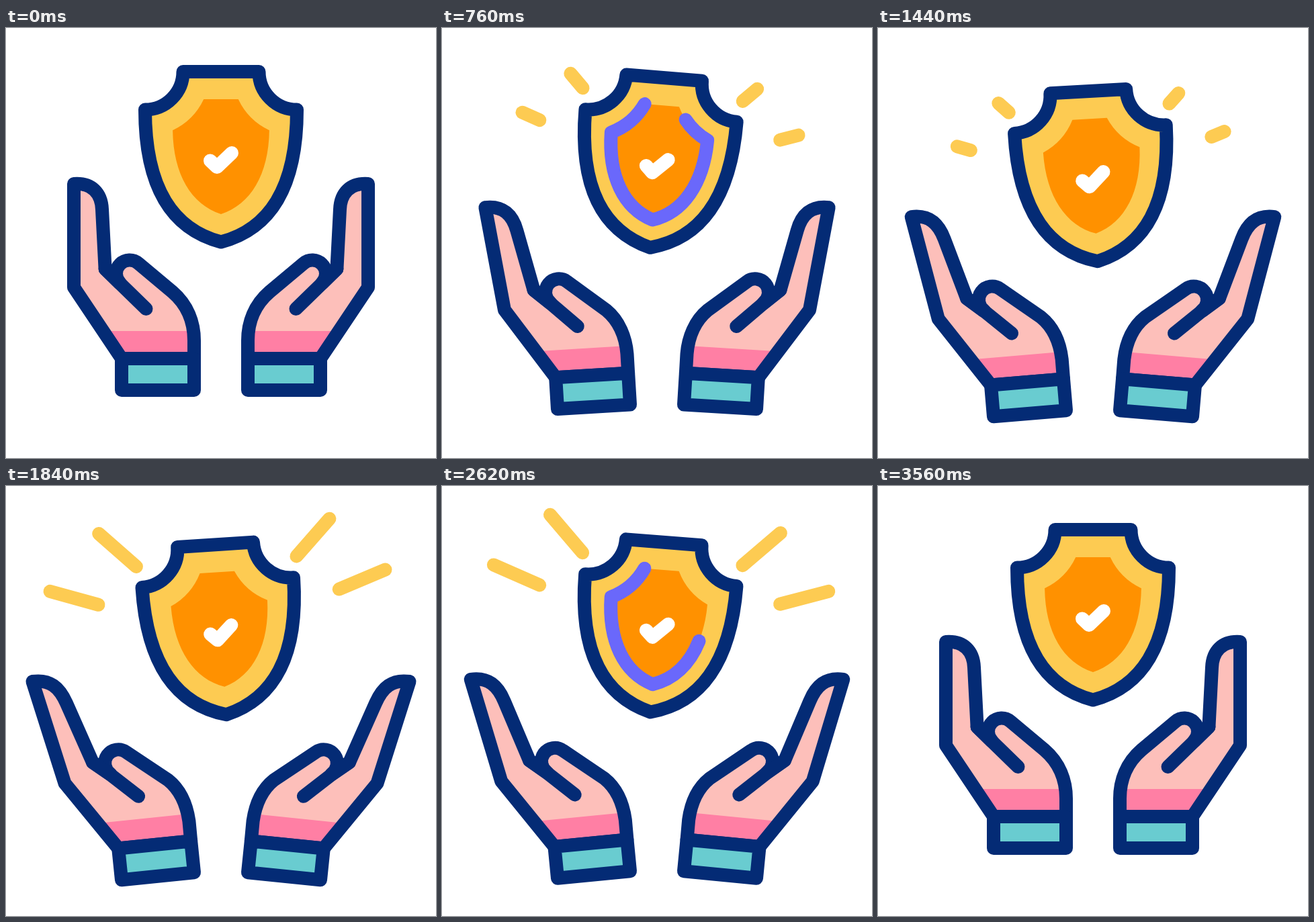
Animation, 640 px wide and 640 px high, one loop 3.6 s. Source, as an HTML page with a canvas:

```html
<!DOCTYPE html>
<html lang="en">
<head>
<meta charset="utf-8">
<title>Shield between hands</title>
<style>
  html, body { margin: 0; width: 100%; height: 100%; overflow: hidden; background: #fff; }
  canvas { display: block; width: 640px; height: 640px; }
</style>
</head>
<body>
<canvas id="stage" width="640" height="640"></canvas>
<script>
const ctx = document.getElementById('stage').getContext('2d');
const LOOP = 3600;
const NAVY = '#042b75', YELLOW = '#fdcb52', ORANGE = '#ff9100', PURPLE = '#6a68fb',
      SKIN = '#fdbfba', PINK = '#ff7fa4', TEAL = '#69ccd0';

const ease = x => (1 - Math.cos(Math.PI * Math.min(1, Math.max(0, x)))) / 2;

// Eased value at time t for keys [time, value]
function track(t, keys) {
  if (t <= keys[0][0]) return keys[0][1];
  for (let i = 1; i < keys.length; i++) {
    const [t0, v0] = keys[i - 1], [t1, v1] = keys[i];
    if (t <= t1) return v0 + (v1 - v0) * ease((t - t0) / (t1 - t0));
  }
  return keys[keys.length - 1][1];
}

// Four dips, 800 ms apart, then back to rest
const bob = (start, low, high, end) => {
  const keys = [[start, 0]];
  for (let i = 0; i < 4; i++) {
    keys.push([start + 400 + 800 * i, low]);
    if (i < 3) keys.push([start + 800 + 800 * i, high]);
  }
  return [...keys, [end, 0]];
};

const HANDS = bob(10, 1.065, .48, 3290);
const SHIELD_Y = bob(60, 49, 2, 3350);
const SHIELD_TILT = [[60, 0], [860, 4.9], [1660, -4.9], [2460, 4.9], [3360, 0]];
const GLOW = [[460, 0], [860, 1], [1260, 0], [2060, 0], [2460, 1], [2860, 0]];
// Ray bursts: [grow from, grow to, fade from, fade to]
const BURSTS = [[550, 1050, 1070, 1240], [1260, 1770, 1880, 2050],
                [2060, 2560, 2650, 2830], [2840, 3340, 3370, 3550]];
// Inner end, outer end
const RAYS = [[200.5, 90, 148, 37.5], [140.5, 143, 70, 118.5]];

// Hand points: upright x, y and lowered x, y
const HAND = {
  tip: [101, 232, 28, 302], tipA: [128, 230, 54, 298], tipB: [142, 246, 68, 310],
  finger: [143, 270, 80, 333], web: [147.6, 358.6, 125.5, 421],
  crease: [169.5, 380, 152.5, 438.5], creaseEnd: [208.5, 418, 195, 470],
  thumb: [184, 365.5, 164, 421], thumbTop: [197, 350.5, 176, 404],
  palm: [248, 393, 240, 446], palmA: [270, 412, 258, 460], palmB: [280, 438, 267, 483],
  side: [280, 465, 271, 505],
  heel: [101, 386, 85, 453],
  bandL: [145, 451, 135, 511.5], bandR: [280, 451, 270, 495],
  cuffL: [172, 492, 166.3, 548.3], cuffR: [280, 492, 274.3, 535.3],
  baseR: [280, 539, 280, 582], baseL: [172, 539, 172, 595]
};

function paint(fill, stroke) {
  if (fill) { ctx.fillStyle = fill; ctx.fill(); }
  if (stroke) { ctx.strokeStyle = stroke; ctx.stroke(); }
}

function poly(points, fill, stroke, close = true) {
  ctx.beginPath();
  points.forEach(p => ctx.lineTo(p[0], p[1]));
  if (close) ctx.closePath();
  paint(fill, stroke);
}

function hand(k) {
  const p = {};
  for (const name in HAND) {
    const [x0, y0, x1, y1] = HAND[name];
    p[name] = [x0 + (x1 - x0) * k, y0 + (y1 - y0) * k];
  }
  const angle = ([ax, ay], [bx, by]) => Math.atan2(by - ay, bx - ax);
  const outline = () => {
    ctx.beginPath();
    ctx.moveTo(...p.cuffL);
    ctx.lineTo(...p.heel);
    ctx.lineTo(...p.tip);
    ctx.bezierCurveTo(...p.tipA, ...p.tipB, ...p.finger);
    ctx.lineTo(...p.web);
    ctx.lineTo(...p.crease);
    ctx.arc(...p.thumb, 20, angle(p.thumb, p.crease), angle(p.thumb, p.thumbTop));
    ctx.lineTo(...p.palm);
    ctx.bezierCurveTo(...p.palmA, ...p.palmB, ...p.side);
    ctx.lineTo(...p.cuffR);
    ctx.closePath();
  };
  outline();
  paint(SKIN);
  poly([p.bandL, p.bandR, p.cuffR, p.cuffL], PINK);
  outline();
  paint(null, NAVY);
  poly([p.web, p.crease, p.creaseEnd], null, NAVY, false);
  poly([p.cuffL, p.cuffR, p.baseR, p.baseL], TEAL, NAVY);
}

// Crest with scooped shoulders, starting at the top left and running down the left side
function crest(r, a, ax, ay, bx, by, tipY) {
  const rx = x => 640 - x, q = Math.PI / 2;
  const sx = 207 + r * Math.sin(a), sy = 65 + r * Math.cos(a);
  ctx.beginPath();
  ctx.arc(207, 65, r, a, q - a);
  ctx.bezierCurveTo(ax, ay, bx, by, 320, tipY);
  ctx.bezierCurveTo(rx(bx), by, rx(ax), ay, rx(sx), sy);
  ctx.arc(433, 65, r, q + a, 2 * q - a);
  ctx.closePath();
}

function rays(t) {
  const burst = BURSTS.find(b => t > b[0] && t < b[3]);
  if (!burst) return;
  const [g0, g1, f0, f1] = burst;
  const end = ease((t - g0) / (g1 - g0)), start = ease((t - f0) / (f1 - f0));
  for (const [x0, y0, x1, y1] of RAYS) {
    const at = s => [x0 + (x1 - x0) * s, y0 + (y1 - y0) * s];
    const line = [at(start), at(end)];
    poly(line, null, YELLOW, false);
    poly(line.map(([x, y]) => [640 - x, y]), null, YELLOW, false);
  }
}

function shield(t) {
  ctx.save();
  ctx.translate(320, 195 + track(t, SHIELD_Y));
  ctx.rotate(track(t, SHIELD_TILT) * Math.PI / 180);
  ctx.translate(-320, -195);
  rays(t);
  crest(56.5, 0, 207, 241, 250, 300, 318.5);
  paint(YELLOW, NAVY);
  crest(96.5, .44, 249, 218, 276, 263, 277);
  paint(ORANGE);
  const glow = track(t, GLOW);
  if (glow > .001) {
    ctx.setLineDash(glow > .999 ? [] : [glow * 490, 1000]);
    paint(null, PURPLE);
    ctx.setLineDash([]);
  }
  poly([[304, 197.5], [314, 207], [336, 186]], null, '#fff', false);
  ctx.restore();
}

function draw(t) {
  ctx.fillStyle = '#fff';
  ctx.fillRect(0, 0, 640, 640);
  ctx.lineWidth = 20;
  ctx.lineCap = ctx.lineJoin = 'round';
  shield(t);
  const k = track(t, HANDS);
  hand(k);
  ctx.save();
  ctx.translate(640, 0);
  ctx.scale(-1, 1);
  hand(k);
  ctx.restore();
}

const began = performance.now();
function tick() {
  draw((performance.now() - began) % LOOP);
  requestAnimationFrame(tick);
}
tick();
</script>
</body>
</html>
```
